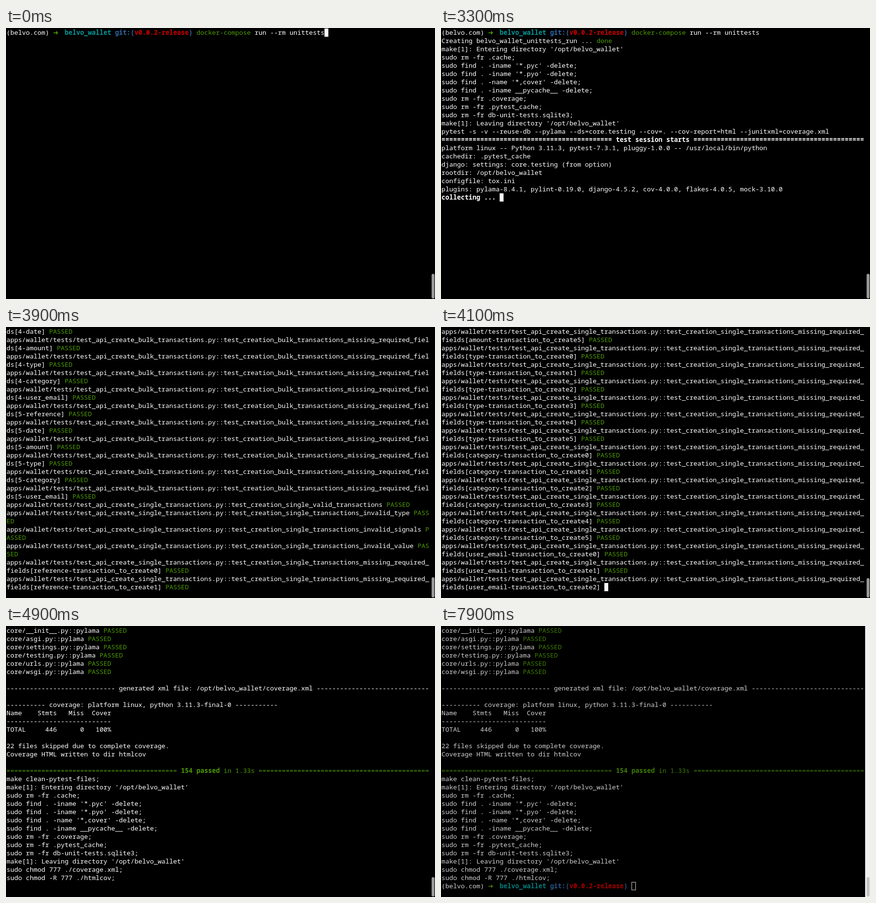
Recreate the animation shown at these times as an HTML page. Size 885x559 px, loop 9400 ms.

```html
<!DOCTYPE html>
<html lang="en">
<head>
<meta charset="utf-8">
<title>Unit test run</title>
<style>
  html, body { margin: 0; width: 100%; height: 100%; overflow: hidden; background: #000; }
  svg { display: block; width: 885px; height: 559px; }
  text { font: 13.333px "Noto Sans Mono", "DejaVu Sans Mono", monospace; white-space: pre; fill: #fff; }
  .g, .G { fill: #4e9a06; }
  .a { fill: #4e9a06; font-family: "DejaVu Sans", sans-serif; }
  .c { fill: #06989a; }
  .b { fill: #3465a4; }
  .r { fill: #cc0000; }
  .w, .G, .a, .c, .b, .r { font-weight: bold; }
</style>
</head>
<body>
<svg viewBox="0 0 885 559">
  <rect width="885" height="559"/>
  <g id="screen"></g>
  <rect id="trough" x="875" width="10" height="559" fill="#f0f0f0"/>
  <rect id="thumb" x="878" width="6" rx="3"/>
</svg>
<script>
const LOOP = 9400, COLS = 109, PAGE = 32, CELL_W = 8, CELL_H = 17;
const $ = id => document.getElementById(id);

// Markup {s|text} gives a run the style s; returns screen rows of runs.
function wrap(line) {
  const rows = [[]];
  let col = 0;
  for (const [whole, style = '', inner] of line.matchAll(/\{(\w)\|([^}]*)\}|[^{]+/g)) {
    let text = inner ?? whole;
    while (text) {
      if (col === COLS) { rows.push([]); col = 0; }
      const part = text.slice(0, COLS - col);
      rows.at(-1).push({ style, col, text: part });
      col += part.length;
      text = text.slice(part.length);
    }
  }
  return rows;
}

const PROMPT = '(belvo.com) {a|➜}  {c|belvo_wallet} {b|git:(}{r|v0.0.2-release}{b|)} ';
const passed = name => name + ' {g|PASSED}';
const range = n => [...Array(n).keys()];
const testFile = name => `apps/wallet/tests/test_${name}.py::`;
const FIELDS = ['reference', 'date', 'amount', 'type', 'category', 'user_email'];

const cleanup = [
  "make[1]: Entering directory '/opt/belvo_wallet'",
  'sudo rm -fr .cache;',
  "sudo find . -iname '*.pyc' -delete;",
  "sudo find . -iname '*.pyo' -delete;",
  "sudo find . -name '*,cover' -delete;",
  'sudo find . -iname __pycache__ -delete;',
  'sudo rm -fr .coverage;',
  'sudo rm -fr .pytest_cache;',
  'sudo rm -fr db-unit-tests.sqlite3;',
  "make[1]: Leaving directory '/opt/belvo_wallet'",
];

const bulk = testFile('api_create_bulk_transactions') + 'test_creation_bulk_';
const single = testFile('api_create_single_transactions') + 'test_creation_single_';
const invalid = ['type', 'signals', 'value'].map(k => 'transactions_invalid_' + k);

const databaseTests = [
  ...invalid.map(k => bulk + k),
  ...range(6).flatMap(i => FIELDS.map(f => `${bulk}transactions_missing_required_fields[${i}-${f}]`)),
  single + 'valid_transactions',
  ...invalid.map(k => single + k),
  ...FIELDS.flatMap(f => range(6).map(i =>
    `${single}transactions_missing_required_fields[${f}-transaction_to_create${i}]`)),
  ...[
    ['api_list_transactions', 'list_transactions', 8],
    ['api_summarize_all_transactions_by_user_email', 'summarize_all_transactions', 8],
    ['api_summarize_user_transactions_by_category', 'summarize_user_transactions', 8],
    ['logic_summarize_transactions_by_user_email', 'summarize_transactions', 6],
    ['models_transactions', 'create_transaction', 6],
    ['serializer_finacial_transaction', 'serialize_transaction', 5],
  ].flatMap(([file, test, n]) => range(n).map(i => `${testFile(file)}test_${test}[${i}]`)),
];

const pylama = (dir, names) => names.split(' ').map(n => `${dir}${n}.py::pylama`);
const validators = testFile('validators') + 'test_';
const styleTests = [
  ...pylama('', 'manage'),
  ...pylama('apps/', '__init__'),
  ...pylama('apps/wallet/', '__init__ apps exceptions logic models serializers validators viewsets'),
  ...pylama('apps/wallet/migrations/', '__init__ 0001_initial'),
  ...pylama('apps/wallet/tests/', '__init__ conftest test_api_create_bulk_transactions ' +
    'test_api_create_single_transactions test_api_list_transactions ' +
    'test_api_summarize_all_transactions_by_user_email test_api_summarize_user_transactions_by_category ' +
    'test_logic_summarize_transactions_by_user_email test_models_transactions ' +
    'test_serializer_finacial_transaction test_validators'),
  ...['signal_amount_validation_for_valid_value', 'signal_amount_validation_for_invalid_value',
    'valid_transaction_types', 'invalid_transaction_types'].map(k => validators + k),
  ...pylama('core/', '__init__ asgi settings testing urls wsgi'),
];

const rows = [
  PROMPT + '{g|docker-compose} run --rm unittests',
  'Creating belvo_wallet_unittests_run ... {g|done}',
  ...cleanup,
  'pytest -s -v --reuse-db --pylama --ds=core.testing --cov=. --cov-report=html --junitxml=coverage.xml',
  `{w|${'='.repeat(44)} test session starts ${'='.repeat(44)}}`,
  'platform linux -- Python 3.11.3, pytest-7.3.1, pluggy-1.0.0 -- /usr/local/bin/python',
  'cachedir: .pytest_cache',
  'django: settings: core.testing (from option)',
  'rootdir: /opt/belvo_wallet',
  'configfile: tox.ini',
  'plugins: pylama-8.4.1, pylint-0.19.0, django-4.5.2, cov-4.0.0, flakes-4.0.5, mock-3.10.0',
  '{w|collected 154 items}',
  '',
  bulk + "valid_transactions Using existing test database for alias 'default'...",
  '{g|PASSED}',
  ...databaseTests.map(passed),
  ...styleTests.map(passed),
  '',
  `${'-'.repeat(28)} generated xml file: /opt/belvo_wallet/coverage.xml ${'-'.repeat(29)}`,
  '',
  '---------- coverage: platform linux, python 3.11.3-final-0 -----------',
  'Name    Stmts   Miss  Cover',
  '-'.repeat(27),
  'TOTAL     446      0   100%',
  '',
  '22 files skipped due to complete coverage.',
  'Coverage HTML written to dir htmlcov',
  '',
  `{g|${'='.repeat(44)} }{G|154 passed}{g| in 1.33s ${'='.repeat(44)}}`,
  'make clean-pytest-files;',
  ...cleanup,
  'sudo chmod 777 ./coverage.xml;',
  'sudo chmod -R 777 ./htmlcov;',
  PROMPT,
].flatMap(wrap);

const plain = row => row.map(run => run.text).join('');
const rowsThrough = start => rows.findIndex(row => plain(row).startsWith(start)) + 1;
const END = rows.length;
const FIRST_BURST = 49;
const SINGLE = rowsThrough('fields[user_email-transaction_to_create2]');
const TESTED = rowsThrough('core/wsgi.py');
const SUMMARY = rowsThrough('='.repeat(44) + ' 154');
const between = (a, b, k) => Math.round(a + (b - a) * k);

// [time, rows printed, cursor, characters or replacement text of the last row]
const steps = [
  [0, 1, 'on'], [300, 1, ''], [900, 1, 'on'], [1500, 1, ''], [1600, 1, 'on'],
  [1700, 2, 'on', 0],
  [2000, 3, 'on', 0],
  [2200, 9, ''],
  [2300, 13, ''],
  [2800, 14, 'on', 0],
  [3300, 21, 'on', '{w|collecting ... }'],
  [3500, 24, ''],
  [3700, FIRST_BURST, '', 10],
  [3800, between(FIRST_BURST, SINGLE, 0.25), ''],
  [3900, between(FIRST_BURST, SINGLE, 0.5), ''],
  [4000, between(FIRST_BURST, SINGLE, 0.75), ''],
  [4100, SINGLE, 'on', 42],
  [4200, between(SINGLE, TESTED, 0.5), 'on'],
  [4300, TESTED, 'on'],
  [4700, SUMMARY + 1, '', 0],
  [4900, END, '', 0],
  [5200, END, ''], [5300, END, 'on'], [5800, END, ''],
  [6500, END, 'on'], [7000, END, ''], [7600, END, 'on'],
  [7800, END, 'hollow'], [7900, END, 'hollow'],
];

const cut = (row, n) => row
  .filter(run => run.col < n)
  .map(run => ({ ...run, text: run.text.slice(0, n - run.col) }));

const drawRow = (row, line) => row.map(({ style, col, text }) =>
  `<text class="${style}" x="${1 + col * CELL_W}" y="${14 + line * CELL_H}">${text}</text>`).join('');

function drawCursor(kind, col, line) {
  const x = 1 + col * CELL_W, y = 1 + line * CELL_H;
  if (kind === 'on') return `<rect x="${x}" y="${y}" width="8" height="17" fill="#fff"/>`;
  if (kind === 'hollow')
    return `<rect x="${x + .5}" y="${y + .5}" width="8" height="16" fill="none" stroke="#fff"/>`;
  return '';
}

function draw([time, count, cursor, tail = COLS]) {
  const scroll = Math.max(0, count - PAGE);
  const visible = rows.slice(scroll, count);
  const last = visible.length - 1;
  visible[last] = typeof tail === 'string' ? wrap(tail)[0] : cut(visible[last], tail);
  const above = rows[scroll - 1] ?? wrap(PROMPT)[0];
  $('screen').innerHTML = drawRow(above, -1) + visible.map(drawRow).join('') +
    drawCursor(cursor, plain(visible[last]).length, last);

  const blur = time >= 7900 ? 1 : time >= 7800 ? 0.5 : 0;
  const height = Math.max(40, 559 * 33 / (361 + scroll));
  $('screen').setAttribute('opacity', 1 - 0.19 * blur);
  $('trough').setAttribute('opacity', blur);
  $('thumb').setAttribute('y', 558 - height);
  $('thumb').setAttribute('height', height);
  $('thumb').setAttribute('fill', blur === 1 ? '#c4c4c4' : '#999');
}

const start = performance.now();
let shown;
function tick() {
  const t = (performance.now() - start) % LOOP;
  const step = steps.findLast(s => s[0] <= t);
  if (step !== shown) draw(shown = step);
  requestAnimationFrame(tick);
}
tick();
</script>
</body>
</html>
```
